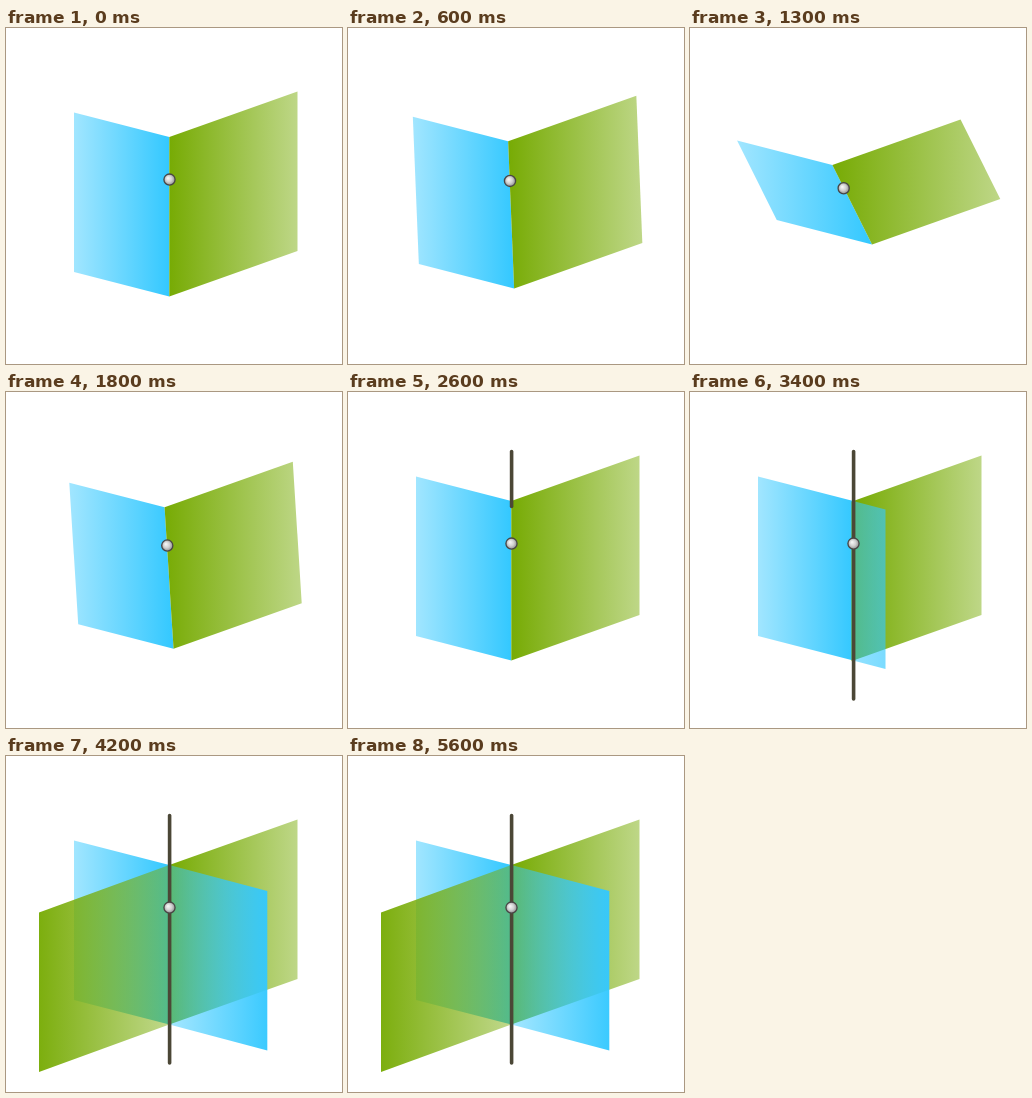
Animation of 336 by 336 pixels, one loop 5900 ms. Source, as an HTML page with a canvas:

```html
<!DOCTYPE html>
<html>
<head>
<meta charset="utf-8">
<style>
html, body { margin: 0; width: 100%; height: 100%; overflow: hidden; background: #fff; }
canvas { display: block; width: 336px; height: 336px; }
</style>
</head>
<body>
<canvas id="stage" width="336" height="336"></canvas>
<script>
const ctx = document.getElementById('stage').getContext('2d');
const LOOP = 5900, STEP = 100;
const AXIS = 163.3, TOP = 109, BOTTOM = 269;
const BLUE = '51,200,255', GREEN = '119,171,4';

const ease = u => u < .5 ? 2 * u * u : 1 - 2 * (1 - u) ** 2;
const tween = (t, from, to) => ease(Math.min(1, Math.max(0, (t - from) / (to - from))));

// A panel with vertical sides; tilt moves its top and bottom edges apart sideways.
function panel(x0, y0, x1, y1, rgb, a0, a1, tilt = 0) {
  const height = BOTTOM - TOP - .5;
  const tx = -21.3 * tilt, ty = 28.4 * tilt, bx = 19.1 * tilt, by = -53 * tilt;
  const fill = ctx.createLinearGradient(x0 + tx, 0, x1 + bx, 0);
  fill.addColorStop(0, `rgba(${rgb},${a0})`);
  fill.addColorStop(1, `rgba(${rgb},${a1})`);
  ctx.fillStyle = fill;
  ctx.beginPath();
  ctx.moveTo(x0 + tx, y0 + ty);
  ctx.lineTo(x1 + tx, y1 + ty);
  ctx.lineTo(x1 + bx, y1 + height + by);
  ctx.lineTo(x0 + bx, y0 + height + by);
  ctx.fill();
}

// A second panel that slides out from the axis, visible only on its far side.
function slide(p, clipX, clipWidth, drawPanel) {
  if (!p) return;
  ctx.save();
  ctx.beginPath();
  ctx.rect(clipX, 0, clipWidth, 336);
  ctx.clip();
  ctx.globalAlpha = .5 + .46 * p;
  drawPanel();
  ctx.restore();
}

function drawAxis(p) {
  if (!p) return;
  ctx.strokeStyle = '#4b4736';
  ctx.lineWidth = 3.6;
  ctx.lineCap = 'round';
  ctx.beginPath();
  ctx.moveTo(AXIS + .3, 59.5);
  ctx.lineTo(AXIS + .3, 59.5 + 247.5 * p);
  ctx.stroke();
}

function drawBall(x, y) {
  const shade = ctx.createRadialGradient(x - 1.5, y - 1.5, .5, x, y, 6);
  shade.addColorStop(0, '#f4f4f4');
  shade.addColorStop(.5, '#cfcfcf');
  shade.addColorStop(1, '#858585');
  ctx.fillStyle = shade;
  ctx.strokeStyle = '#494545';
  ctx.lineWidth = 1.3;
  ctx.beginPath();
  ctx.arc(x, y, 5.6, 0, 2 * Math.PI);
  ctx.fill();
  ctx.stroke();
}

function draw(now) {
  const t = Math.floor(now % LOOP / STEP) * STEP;
  const tilt = t < 1400 ? tween(t, 300, 1400) : 1 - tween(t, 1400, 2000);
  const blue = tween(t, 3100, 3840), green = tween(t, 3320, 4200);

  ctx.fillStyle = '#fff';
  ctx.fillRect(0, 0, 336, 336);

  panel(68, 84.5, AXIS, TOP, BLUE, .46, 1, tilt);
  panel(AXIS, TOP, 291.5, 63.5, GREEN, 1, .48, tilt);

  slide(blue, AXIS, 200, () => {
    const dx = 98 * blue, dy = 26 * blue;
    panel(AXIS - 98 + dx, TOP - 26 + dy, AXIS + dx, TOP + dy, BLUE, .46, 1);
  });
  slide(green, 0, AXIS, () => {
    const dx = 130.3 * green, dy = 47.5 * green;
    panel(AXIS - dx, TOP + dy, AXIS + 130.3 - dx, TOP - 47.5 + dy, GREEN, 1, .48);
  });

  drawAxis(tween(t, 2400, 3000));
  drawBall(163.5 - 10 * tilt, 151.6 + 8.8 * tilt);
  requestAnimationFrame(draw);
}
requestAnimationFrame(draw);
</script>
</body>
</html>
```
